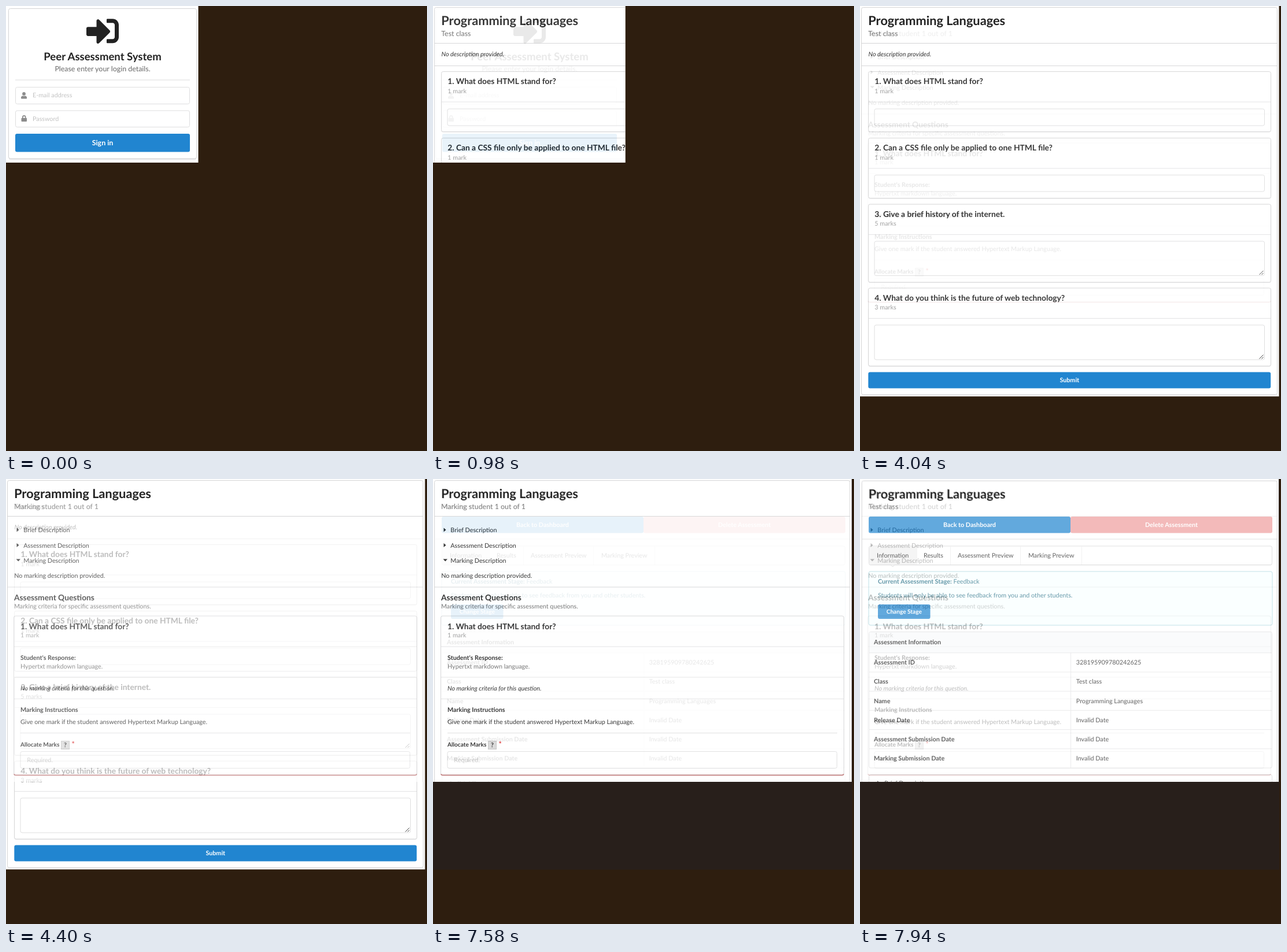
Write an HTML page that moves like this. It is 728 by 770 pixels and loops after 8000 ms.

```html
<!DOCTYPE html>
<html lang="en">
<head>
<meta charset="utf-8">
<title>Peer Assessment System</title>
<style>
  html, body { margin: 0; width: 100%; height: 100%; overflow: hidden; background: #2e1e0f; }
  svg, #below { position: absolute; left: 0; top: 0; }
  svg { width: 728px; height: 770px; background: #fff; }
  #below { width: 725px; height: 676px; background: #281f1b; }
  text { font-family: Lato, "Open Sans", sans-serif; fill: #222; text-rendering: geometricPrecision; white-space: pre; }
  .b { font-weight: 700; }
  .i { font-style: italic; }
  .m { text-anchor: middle; }
  .sub { fill: #686868; }
  .pale { fill: #999; }
  .hint { fill: #c3c3c3; }
  .white { fill: #fff; }
  .teal { fill: #276f86; }
  .red { fill: #db2828; }
</style>
</head>
<body>
<div id="below"></div>
<script>
const H1 = 21.76, H2 = 18.55, H3 = 13.77, LARGE = 12.43, BODY = 10.77, SMALL = 10.1;
const BLUE = '#2185d0', EDGE = '#d4d4d5', FIELD = '#dededf', RULE = '#e3e3e4';

// cy is the middle of the capital letters
const text = (x, cy, str, cls = '', size = BODY) =>
  `<text x="${x}" y="${cy + size * 0.36}" font-size="${size}" class="${cls}">${str}</text>`;
const box = (x0, y0, x1, y1, fill = '#fff', stroke = 'none', r = 3) =>
  `<rect x="${x0}" y="${y0}" width="${x1 - x0}" height="${y1 - y0}" rx="${r}" fill="${fill}" stroke="${stroke}"/>`;
const line = (x0, y0, x1, y1, color = EDGE) =>
  `<path d="M${x0} ${y0}L${x1} ${y1}" stroke="${color}"/>`;
const icon = (x, y, scale, color, d) =>
  `<path transform="translate(${x} ${y}) scale(${scale})" fill="${color}" d="${d}"/>`;
const shape = (d, fill = '#222') => `<path d="${d}" fill="${fill}"/>`;
const card = (x0, y0, x1, y1) =>
  box(x0, y0 + 1, x1, y1 + 1, '#e4e4e5') + box(x0, y0, x1, y1, '#fff', EDGE);
const field = (x0, y0, x1, y1) => box(x0, y0, x1, y1, '#fff', FIELD);
const button = (x0, y0, x1, y1, str, size, fill = BLUE, r = 3) =>
  box(x0, y0, x1, y1, fill, 'none', r) + text((x0 + x1) / 2, (y0 + y1) / 2 - 0.3, str, 'b m white', size);

const ENTER = 'M416 448h-84c-6.6 0-12-5.4-12-12v-40c0-6.6 5.4-12 12-12h84c17.7 0 32-14.3 32-32V160c0-17.7-14.3-32-32-32h-84c-6.6 0-12-5.4-12-12V76c0-6.6 5.4-12 12-12h84c53 0 96 43 96 96v192c0 53-43 96-96 96zM369 247L201 79c-15-15-41-4.5-41 17v96H24c-13.3 0-24 10.7-24 24v96c0 13.3 10.7 24 24 24h136v96c0 21.5 26 32 41 17l168-168c9.3-9.4 9.3-24.6 0-34z';
const USER = 'M224 256a128 128 0 1 0 0-256a128 128 0 0 0 0 256zM314 288h-17q-73 32-146 0h-17C60 288 0 348 0 422v42q0 48 48 48h352q48 0 48-48v-42C448 348 388 288 314 288z';
const LOCK = 'M400 224h-24v-72a152 152 0 0 0-304 0v72H48q-48 0-48 48v192q0 48 48 48h352q48 0 48-48V272q0-48-48-48zM296 224H152v-72a72 72 0 0 1 144 0z';

function login() {
  return box(5, 7, 329, 266.5, '#ececed') + card(4.5, 4.5, 329.5, 264) +
    icon(139, 15.2, 0.1094, '#222', ENTER) +
    text(167, 87.7, 'Peer Assessment System', 'b m', H2) +
    text(167, 109, 'Please enter your login details.', 'sub m', LARGE) +
    line(16, 128, 318, 128, '#dcdcdd') +
    field(16.5, 140.5, 317.5, 169.5) + icon(26, 149, 0.0225, '#8c8c8c', USER) +
    text(46, 154.5, 'E-mail address', 'hint') +
    field(16.5, 181, 317.5, 209.5) + icon(26.5, 189, 0.0213, '#8c8c8c', LOCK) +
    text(46, 195, 'Password', 'hint') +
    button(16, 221, 318, 252.5, 'Sign in', LARGE);
}

function question(y, end, str, marks, top, bottom, grip) {
  return card(14.5, y, 710.5, end) +
    text(25.3, y + 17, str, 'b', H3) + text(25.3, y + 33.4, marks, 'pale') +
    line(15, y + 52.5, 710, y + 52.5, RULE) +
    field(25, top, 699.5, bottom) +
    (grip ? line(690.5, bottom - 1.5, 697.5, bottom - 8.5, '#444') +
            line(694.5, bottom - 1.5, 697.5, bottom - 4.5, '#444') : '');
}

function test() {
  return card(2.5, 2.5, 721.5, 672.5) +
    text(14.3, 25.6, 'Programming Languages', 'b', H1) +
    text(14.3, 47.2, 'Test class', 'sub', LARGE) +
    line(3, 64.5, 721, 64.5) + line(3, 103.5, 721, 103.5) +
    text(14.5, 83.2, 'No description provided.', 'i') +
    question(113.5, 217.5, '1. What does HTML stand for?', '1 mark', 178, 207) +
    question(228.5, 332.5, '2. Can a CSS file only be applied to one HTML file?', '1 mark', 292.5, 321) +
    question(343, 478, '3. Give a brief history of the internet.', '5 marks', 407, 466.5, true) +
    question(488, 623, '4. What do you think is the future of web technology?', '3 marks', 552, 612, true) +
    button(14.3, 633.6, 710.2, 661.4, 'Submit', BODY);
}

function marking() {
  return card(2.5, 2.5, 721, 540) +
    text(14, 25.6, 'Programming Languages', 'b', H1) +
    text(14, 47.2, 'Marking student 1 out of 1', 'sub', LARGE) +
    line(3, 64.5, 721, 64.5) +
    shape('M18.5 84.5v7l4-3.5zM18.5 111v7l4-3.5zM17.5 138.5h7.5l-3.75 4z') +
    text(30.3, 88.5, 'Brief Description') +
    text(30.3, 115, 'Assessment Description') +
    text(30.3, 141, 'Marking Description') +
    text(14.3, 167.3, 'No marking description provided.') +
    line(3, 187, 721, 187) +
    text(14, 205, 'Assessment Questions', 'b', H3) +
    text(14, 220.6, 'Marking criteria for specific assessment questions.', 'sub') +
    card(13.5, 237, 710.5, 512) +
    `<path d="M14 510.5q0 2 3 2H707q3 0 3-2" fill="none" stroke="#b96464" stroke-width="1.5"/>` +
    text(25, 254.8, '1. What does HTML stand for?', 'b', H3) + text(25, 270.4, '1 mark', 'pale') +
    line(14, 290, 710, 290, RULE) +
    text(25, 308.8, "Student's Response:", 'b') + text(25, 324.3, 'Hypertxt markdown language.', 'sub') +
    line(14, 343, 710, 343, RULE) +
    text(25, 361.8, 'No marking criteria for this question.', 'i') +
    line(14, 380.5, 710, 380.5, RULE) +
    text(25, 399.3, 'Marking Instructions', 'b') +
    text(25, 420.3, 'Give one mark if the student answered Hypertext Markup Language.') +
    line(25, 439.5, 699, 439.5, '#dcdcdd') +
    text(25, 459.2, 'Allocate Marks', 'b', SMALL) +
    box(95.5, 453.5, 109.5, 467.5, '#d6d6d6', '#c2c2c2', 0) + text(102.5, 460.4, '?', 'b m') +
    text(113.5, 458.6, '*', 'b red', LARGE) +
    field(25, 471.5, 698.5, 500.5) + text(36.3, 486.2, 'Required.', 'hint');
}

function overview() {
  const rows = [
    ['Assessment ID', '328195909780242625'], ['Class', 'Test class'], ['Name', 'Programming Languages'],
    ['Release Date', 'Invalid Date'], ['Assessment Submission Date', 'Invalid Date'],
    ['Marking Submission Date', 'Invalid Date']];
  const table = rows.map(([key, value], n) => {
    const y = 317.3 + n * 33.2;
    return line(15, y - 16.5, 713, y - 16.5, RULE) + text(24, y, key, 'b') + text(373.8, y, value);
  }).join('');
  const tabs = [[98, 29, 'Information'], [156.5, 110, 'Results'],
                [277.5, 169, 'Assessment Preview'], [383.5, 291, 'Marking Preview']];
  return card(3.5, 3.5, 721.5, 540) +
    text(15, 26.2, 'Programming Languages', 'b', H1) +
    text(15, 48, 'Test class', 'sub', LARGE) +
    button(15, 65, 364, 93.5, 'Back to Dashboard', BODY) +
    button(364, 65, 713, 93.5, 'Delete Assessment', BODY, '#ef9e9e') +
    line(4, 104, 721, 104) +
    card(15.5, 116, 712.5, 148.5) + box(16, 116.5, 98, 148, '#f2f2f2') +
    tabs.map(([edge, x, str]) => line(edge, 116, edge, 148, '#ececec') + text(x, 131.8, str)).join('') +
    `<path d="M53 148.5l3.5 3.5l3.5-3.5" fill="#f2f2f2" stroke="${EDGE}"/>` +
    box(15, 160, 713, 253, '#f8ffff', '#a9d5de') +
    `<text x="31" y="181" font-size="${BODY}" class="teal"><tspan class="b">Current Assessment Stage:</tspan> Feedback</text>` +
    text(31, 201.2, 'Students will only be able to see feedback from you and other students.', 'teal') +
    button(31, 217, 121.5, 242, 'Change Stage', SMALL) +
    box(15.5, 264.5, 712.5, 500, '#fff', FIELD) + box(16, 265, 712, 301, '#f9fafb') +
    text(24, 282.5, 'Assessment Information', 'b') + table +
    line(364.5, 301, 364.5, 500, RULE) +
    card(15.5, 511.5, 712.5, 560) +
    shape('M30 522v7l4-3.5z') + text(42, 526, 'Brief Description');
}

// each screen has a size and starts fading in at its time, in steps of a tenth every 60 ms
const screens = [
  [login, 332.5, 271, -600], [test, 724.5, 675.5, 500],
  [marking, 724, 524, 4040], [overview, 724, 524, 7580]
].map(([draw, w, h, start]) => {
  document.body.insertAdjacentHTML('beforeend', `<svg>${draw()}</svg>`);
  return { el: document.body.lastElementChild, w, h, start };
});
const below = document.getElementById('below');

function frame(now) {
  const t = now % 8000;
  const level = s => Math.max(0, Math.min(10, Math.floor((t - s.start) / 60) + 1));
  screens.forEach((s, n) => {
    const k = level(s), prev = screens[n - 1], next = screens[n + 1];
    // a fading screen only covers the area of the one under it
    const area = prev && k < 10 ? prev : s;
    const w = Math.min(s.w, area.w), h = Math.min(s.h, area.h);
    s.el.style.display = k && !(next && level(next) === 10) ? 'block' : 'none';
    s.el.style.opacity = k / 10;
    s.el.style.clipPath = `polygon(0 0, ${w}px 0, ${w}px ${h}px, 0 ${h}px)`;
  });
  below.style.display = level(screens[2]) === 10 ? 'block' : 'none';
}

const begin = performance.now();
function loop() {
  frame(performance.now() - begin);
  requestAnimationFrame(loop);
}
loop();
</script>
</body>
</html>
```
